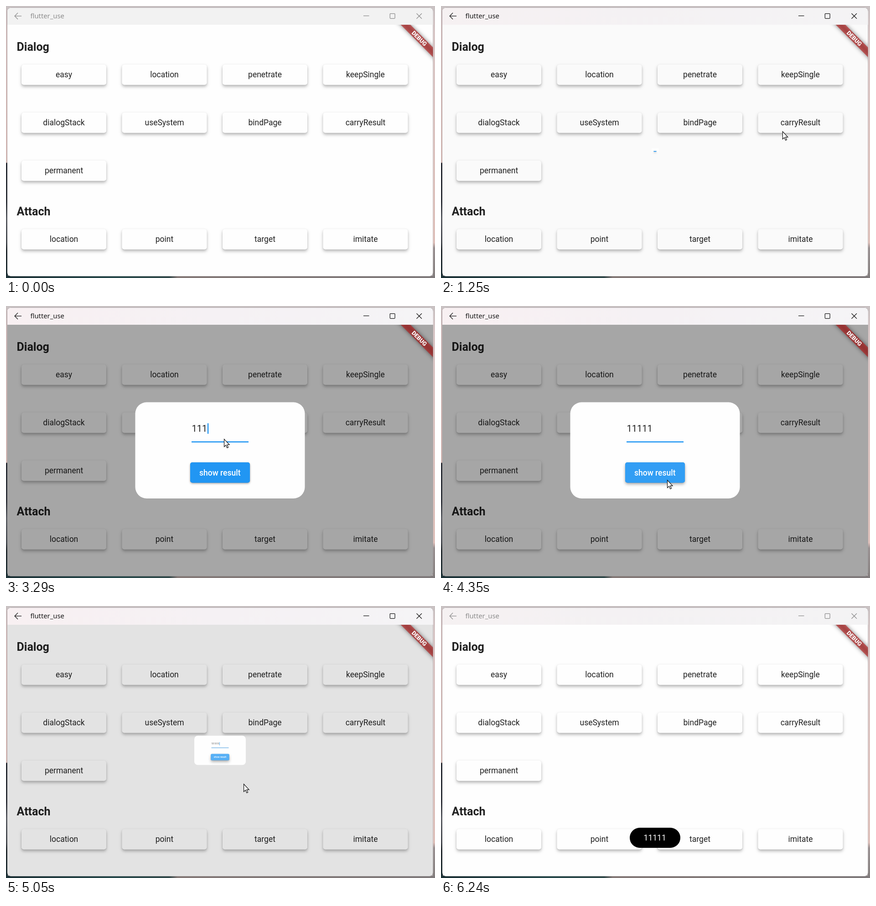
Recreate the animation shown at these times as an HTML page with a canvas. Size 941x595 px, loop 6270 ms.

```html
<!DOCTYPE html>
<html lang="en">
<head>
<meta charset="utf-8">
<title>Dialog demo</title>
<style>
  html, body { margin: 0; width: 100%; height: 100%; overflow: hidden; }
  canvas { display: block; width: 941px; height: 595px; }
</style>
</head>
<body>
<canvas id="stage" width="941" height="595"></canvas>
<script>
const W = 941, H = 595, LOOP = 6270;
const BLUE = '#2196f3', INK = '#212121';
const stage = document.getElementById('stage').getContext('2d');
let ctx = stage;

const clamp = v => Math.max(0, Math.min(1, v));
const progress = (t, from, to) => clamp((t - from) / (to - from));
const between = (t, from, to) => t >= from && t < to;
const lerp = (a, b, k) => a + (b - a) * k;
const smooth = k => k * k * (3 - 2 * k);

// Pointer path: time, x, y
const POINTER = [
  [190, 878, 596], [810, 806, 262], [940, 806, 262], [1190, 770.5, 274],
  [1550, 494, 282], [1950, 479, 284.5], [3030, 479, 284.5], [3580, 478, 299],
  [3710, 478, 299], [4320, 496.5, 381], [4985, 496.5, 381], [5400, 866, 508],
  [5460, 872, 517], [5900, 891, 597]
];
const KEYS = [3060, 3170, 3280, 3390, 3500];

function pointerAt(t) {
  const i = POINTER.findIndex(p => p[0] > t);
  if (i < 1) return null;
  const [t0, x0, y0] = POINTER[i - 1], [t1, x1, y1] = POINTER[i];
  const k = smooth(progress(t, t0, t1));
  return [lerp(x0, x1, k), lerp(y0, y1, k)];
}

function box(x, y, w, h, r, fill) {
  ctx.beginPath();
  ctx.roundRect(x, y, w, h, r);
  if (fill) {
    ctx.fillStyle = fill;
    ctx.fill();
  }
}

function raised(x, y, w, h, fill, dy, blur, alpha) {
  ctx.save();
  ctx.shadowColor = `rgba(0,0,0,${alpha})`;
  ctx.shadowBlur = blur;
  ctx.shadowOffsetY = dy;
  box(x, y, w, h, 5, fill);
  ctx.shadowColor = 'rgba(0,0,0,.12)';
  ctx.shadowBlur = 2;
  ctx.shadowOffsetY = 0.5;
  box(x, y, w, h, 5, fill);
  ctx.restore();
}

function text(str, x, y, font, fill, align = 'center') {
  ctx.font = font;
  ctx.textAlign = align;
  ctx.fillStyle = fill;
  ctx.fillText(str, x, y);
}

const roboto = (size, weight = 400) => `${weight} ${size}px Roboto, sans-serif`;

function line(...pts) {
  ctx.beginPath();
  for (let i = 0; i < pts.length; i += 2) ctx.lineTo(pts[i], pts[i + 1]);
  ctx.stroke();
}

function gradient(x0, y0, x1, y1, stops) {
  const g = ctx.createLinearGradient(x0, y0, x1, y1);
  stops.forEach(([at, color]) => g.addColorStop(at, color));
  return g;
}

function clipBody() {
  ctx.beginPath();
  ctx.roundRect(3, 41, 933.5, 550, [0, 0, 8, 8]);
  ctx.clip();
}

function drawDesktop() {
  ctx.fillStyle = '#c9c2c3';
  ctx.fillRect(0, 0, W, H);
  ctx.fillStyle = gradient(0, 0, 0, H, [
    [0, '#c9bfc0'], [.1, '#d3bfbf'], [.575, '#d8bdb9'], [.578, '#2c3038'],
    [.72, '#34383f'], [.78, '#62656b'], [.87, '#4b4f55'], [.9, '#262d31'], [1, '#1e3136']]);
  ctx.fillRect(0, 4, 4, H);
  ctx.fillStyle = gradient(0, 0, 0, H, [
    [0, '#c8c1c2'], [.1, '#d9c7c7'], [.87, '#dfc1bb'], [.89, '#9a9192'], [1, '#85807f']]);
  ctx.fillRect(936, 4, 5, H);
  ctx.fillStyle = gradient(0, 0, W, 0, [
    [0, '#1c3136'], [.25, '#274a4c'], [.38, '#324a4b'], [.4, '#857a78'], [1, '#807b7c']]);
  ctx.fillRect(0, 590, W, 5);
}

function drawPage() {
  drawDesktop();
  box(2.5, 3.5, 934.5, 588, 8.5, 'rgba(110,105,108,.55)');
  box(3, 4, 933.5, 587, 8, '#fefefe');

  text('Dialog', 23.5, 98, roboto(25, 700), INK, 'left');
  text('Attach', 23.5, 458, roboto(25, 700), INK, 'left');
  const rows = [
    [128, 'easy location penetrate keepSingle'],
    [233, 'dialogStack useSystem bindPage carryResult'],
    [338, 'permanent'],
    [488, 'location point target imitate']
  ];
  for (const [y, names] of rows) {
    names.split(' ').forEach((name, i) => {
      const x = 34 + i * 220.5;
      raised(x, y, 186, 44.5, '#fefefe', 4, 6, .27);
      text(name, x + 93, y + 28.4, roboto(17.5), INK);
    });
  }
}

function drawTitle(t) {
  const active = between(t, 1130, 6180);
  const tint = t < 3000 ? progress(t, 1110, 1330) : 1 - progress(t, 6170, 6330);
  ctx.save();
  ctx.beginPath();
  ctx.roundRect(3, 4, 933.5, 37, [8, 8, 0, 0]);
  ctx.clip();
  ctx.fillStyle = '#f2f2f2';
  ctx.fillRect(3, 4, 934, 37);
  ctx.globalAlpha = tint;
  ctx.fillStyle = gradient(3, 0, 936, 0, [[0, '#f8f0f2'], [.5, '#f5f1f4'], [1, '#f5f4f6']]);
  ctx.fillRect(3, 4, 934, 37);
  ctx.restore();

  const color = active ? '#191919' : '#8d8d8d';
  text('flutter_use', 53.5, 27.3, '14.8px "Noto Sans", sans-serif', color, 'left');
  ctx.strokeStyle = color;
  ctx.lineWidth = 1.25;
  line(19, 22, 34, 22);
  line(26, 15, 19, 22, 26, 29);
  line(784, 21.5, 796.5, 21.5);
  box(842.3, 16.5, 10.8, 10.8, 1.2);
  ctx.stroke();
  line(900.5, 16.3, 912, 27.8);
  line(912, 16.3, 900.5, 27.8);
}

function drawBanner() {
  ctx.save();
  clipBody();
  ctx.translate(936.5, 41);
  ctx.rotate(Math.PI / 4);
  ctx.save();
  ctx.filter = 'blur(4.9px)';
  ctx.fillStyle = 'rgba(0,0,0,.5)';
  ctx.fillRect(-70, 35, 140, 15);
  ctx.restore();
  ctx.fillStyle = 'rgba(183,28,28,.627)';
  ctx.fillRect(-70, 35, 140, 15);
  text('DEBUG', 0, 46.8, roboto(12.75, 900), '#fff');
  ctx.restore();
}

function drawField(t) {
  const focus = progress(t, 2130, 2290);
  ctx.fillStyle = '#a6a6a6';
  ctx.fillRect(407, 296, 125, 1.3);
  if (focus > 0) {
    ctx.globalAlpha = focus;
    ctx.fillStyle = BLUE;
    ctx.fillRect(407, 296, 125, lerp(1.25, 2.5, focus));
    ctx.globalAlpha = 1;
  }
  const typed = '1'.repeat(KEYS.filter(k => t >= k).length);
  text(typed, 407.5, 275, roboto(20), INK, 'left');
  if (between(t, 2130, 2550) || between(t, 3030, 4350) || t >= 4780) {
    ctx.fillStyle = BLUE;
    ctx.fillRect(408 + typed.length * 11.3, 256.5, 2.4, 23);
  }
}

function drawSubmit(t, pointer) {
  const hover = t > 3700 && pointer && pointer[1] > 342;
  raised(404, 342, 131, 44.5, BLUE, hover ? 3.5 : 2, hover ? 6 : 4, .32);
  if (hover) box(404, 342, 131, 44.5, 5, 'rgba(255,255,255,.08)');
  if (t >= 4780) {
    ctx.save();
    box(404, 342, 131, 44.5, 5);
    ctx.clip();
    ctx.beginPath();
    ctx.arc(496.5, 381, 86 * (t - 4780) / 190, 0, Math.PI * 2);
    ctx.fillStyle = `rgba(255,255,255,${.18 * progress(t, 4780, 4860)})`;
    ctx.fill();
    ctx.restore();
  }
  text('show result', 469.3, 370.5, roboto(17.5, 500), '#fff');
}

function drawDialog(t, shown, pointer) {
  ctx.save();
  clipBody();
  ctx.fillStyle = `rgba(0,0,0,${.35 * shown})`;
  ctx.fillRect(0, 41, W, H);
  ctx.translate(469.5, 315.8);
  ctx.scale(shown, shown);
  ctx.translate(-469.5, -315.8);
  box(283.5, 210.5, 372, 210.5, 25, '#fefefe');
  drawField(t);
  drawSubmit(t, pointer);
  ctx.restore();
}

function drawToast(t) {
  ctx.save();
  ctx.globalAlpha = progress(t, 5140, 5340);
  box(414, 485, 111, 44, 22, '#000');
  text('11111', 469.2, 512.8, roboto(17.5), '#fff');
  ctx.restore();
}

function drawPointer([x, y]) {
  const shape = new Path2D('M0 0V16.6L3.8 13.2L6.4 19.2L9 18L6.4 12.3H11.5Z');
  ctx.save();
  ctx.translate(x, y);
  ctx.lineWidth = 1.2;
  ctx.strokeStyle = '#111';
  ctx.fillStyle = '#fff';
  ctx.fill(shape);
  ctx.stroke(shape);
  ctx.restore();
}

// The page behind the dialog never changes, so it is painted once.
const page = document.createElement('canvas');
page.width = W;
page.height = H;
ctx = page.getContext('2d');
drawPage();
ctx = stage;

function frame() {
  const t = performance.now() % LOOP;
  const pointer = pointerAt(t);
  const shown = progress(t, 1240, 1500) - progress(t, 4870, 5130);
  ctx.drawImage(page, 0, 0);
  drawTitle(t);
  if (shown > 0) drawDialog(t, shown, pointer);
  drawBanner();
  if (t > 5140) drawToast(t);
  if (pointer) drawPointer(pointer);
  requestAnimationFrame(frame);
}
frame();
</script>
</body>
</html>
```
